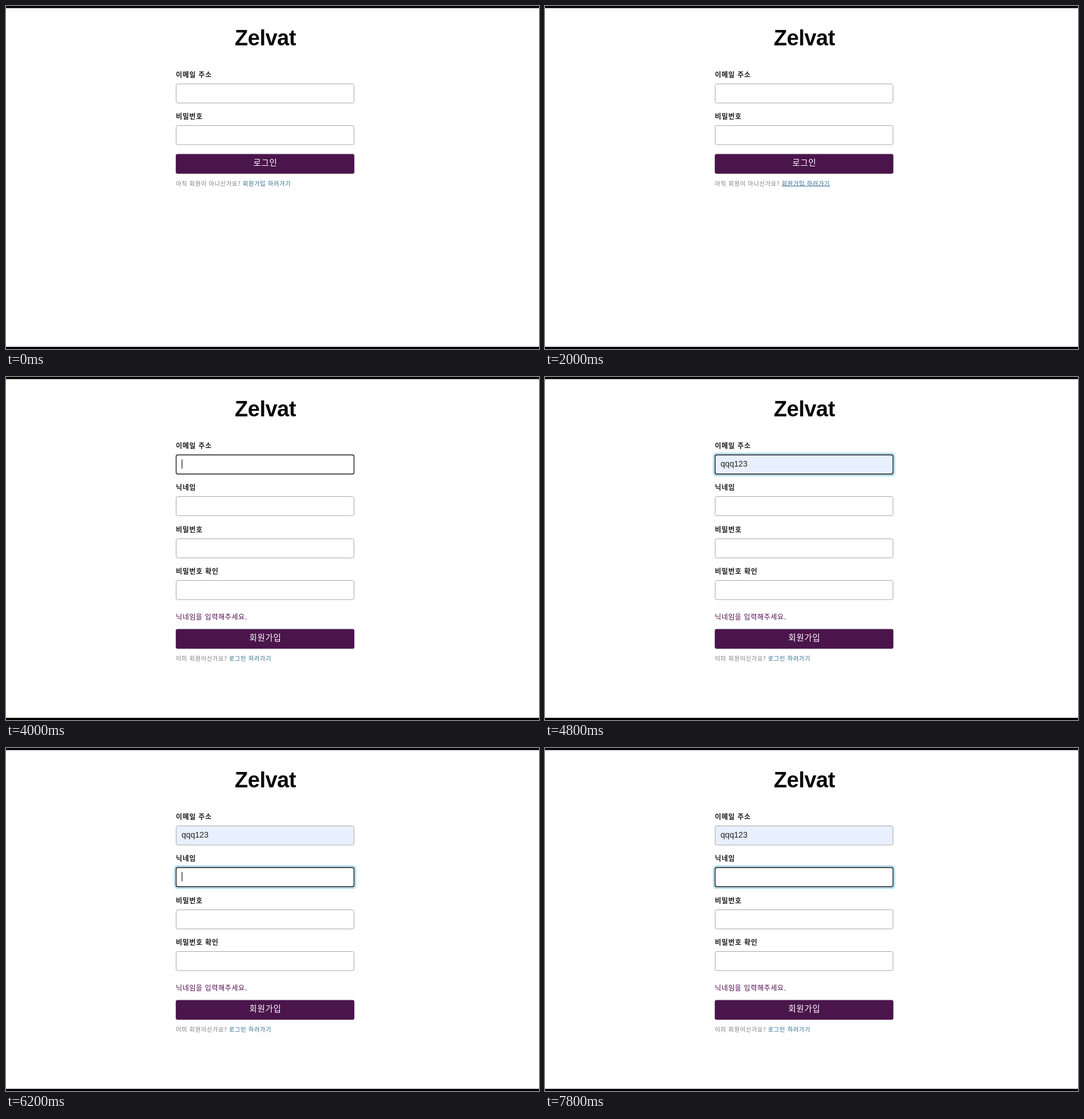
An HTML page for the animation above (8000 ms loop, 932 by 601 pixels).

```html
<!DOCTYPE html>
<html lang="ko">
<head>
<meta charset="utf-8">
<style>
html, body { margin: 0; width: 100%; height: 100%; overflow: hidden; background: #fff; }
svg { display: block; }
text { font-family: "Noto Sans CJK KR", "Noto Sans CJK", "Noto Sans KR", sans-serif; }
.title, .value { font-family: "Liberation Sans", Arial, sans-serif; }
.title { font-size: 38px; font-weight: 700; letter-spacing: -.5px; text-anchor: middle; fill: #080808; }
.value { font-size: 14.1px; fill: #222; }
.label { font-size: 12px; font-weight: 700; letter-spacing: .75px; fill: #1d1c1d; }
.error { font-size: 12px; font-weight: 500; letter-spacing: .65px; fill: #520a4e; }
.button { font-size: 14.5px; font-weight: 500; letter-spacing: .65px; text-anchor: middle; fill: #fff; }
.hint { font-size: 10.1px; letter-spacing: .8px; fill: #777; }
.link { font-size: 10.1px; font-weight: 500; letter-spacing: .8px; fill: #25678c; }
.bar { fill: #4a154b; filter: drop-shadow(0 .8px 1.2px rgba(0, 0, 0, .35)); }
</style>
</head>
<body>
<svg id="stage" width="932" height="601" viewBox="0 0 932 601"></svg>
<script>
const LOOP = 8000, STEP = 200, LEFT = 297, ROW = 73.3;
const stage = document.getElementById('stage');

const text = (cls, x, y, str) => `<text class="${cls}" x="${x}" y="${y}">${str}</text>`;
const rect = (x, y, w, h, attrs) => `<rect x="${x}" y="${y}" width="${w}" height="${h}" ${attrs}/>`;

function field(row, label, { halo = 0, focus = false, filled = false, caret = 0 } = {}) {
  const y = Math.round(136 + row * ROW);
  return text('label', LEFT, y - 11, label) +
    (halo ? rect(293.5, y - 3.5, 319, 41.5, `rx="6" fill="#b9dfee" opacity="${halo}"`) : '') +
    rect(297.5, y + .5, 311, 33.5,
      `rx="3" fill="${filled ? '#e8f0fe' : '#fff'}" stroke="${focus ? '#1b1b1b' : '#a8a7a8'}" stroke-width="${focus ? 1.4 : 1}"`) +
    (filled ? text('value', 307, y + 21, 'qqq123') : '') +
    (caret ? rect(caret, y + 8.5, 1.2, 16, 'fill="#111"') : '');
}

function footer(y, action, hint, linkX, link) {
  return rect(LEFT, y, 312, 34.3, 'rx="3" class="bar"') +
    text('button', 453.5, y + 20.5, action) +
    text('hint', LEFT, y + 55, hint) +
    text('link', linkX, y + 55, link);
}

function login(t) {
  return field(0, '이메일 주소') + field(1, '비밀번호') +
    footer(259.5, '로그인', '아직 회원이 아니신가요?', 414, '회원가입 하러가기') +
    (t >= 1800 ? rect(414, 315, 84, 1, 'fill="#25678c"') : '');
}

function signup(t) {
  const within = (from, to) => t >= from && t < to;
  const email = {
    focus: within(4000, 6000),
    halo: within(4200, 6000) ? 1 : within(6000, 6200) ? .5 : 0,
    filled: t >= 4800,
    caret: within(4000, 4600) || within(5200, 5400) ? 307.2 : within(5400, 6000) ? 353.6 : 0
  };
  const nickname = {
    focus: t >= 6000,
    halo: t >= 6200 ? 1 : 0,
    caret: within(6000, 6600) || within(7200, 7600) ? 307.2 : 0
  };
  return field(0, '이메일 주소', email) + field(1, '닉네임', nickname) +
    field(2, '비밀번호') + field(3, '비밀번호 확인') +
    text('error', LEFT, 425, '닉네임을 입력해주세요.') +
    footer(441.7, '회원가입', '이미 회원이신가요?', 390, '로그인 하러가기');
}

let shown = -1;
function draw(now) {
  const t = Math.floor(now % LOOP / STEP) * STEP;
  if (t !== shown) {
    shown = t;
    stage.innerHTML = rect(0, 0, 932, 3.7, '') + rect(0, 597.2, 932, 3.8, '') +
      text('title', 453.5, 69.3, 'Zelvat') + (t < 2200 ? login(t) : signup(t));
  }
  requestAnimationFrame(() => draw(performance.now() - start));
}
const start = performance.now();
draw(0);
</script>
</body>
</html>
```
